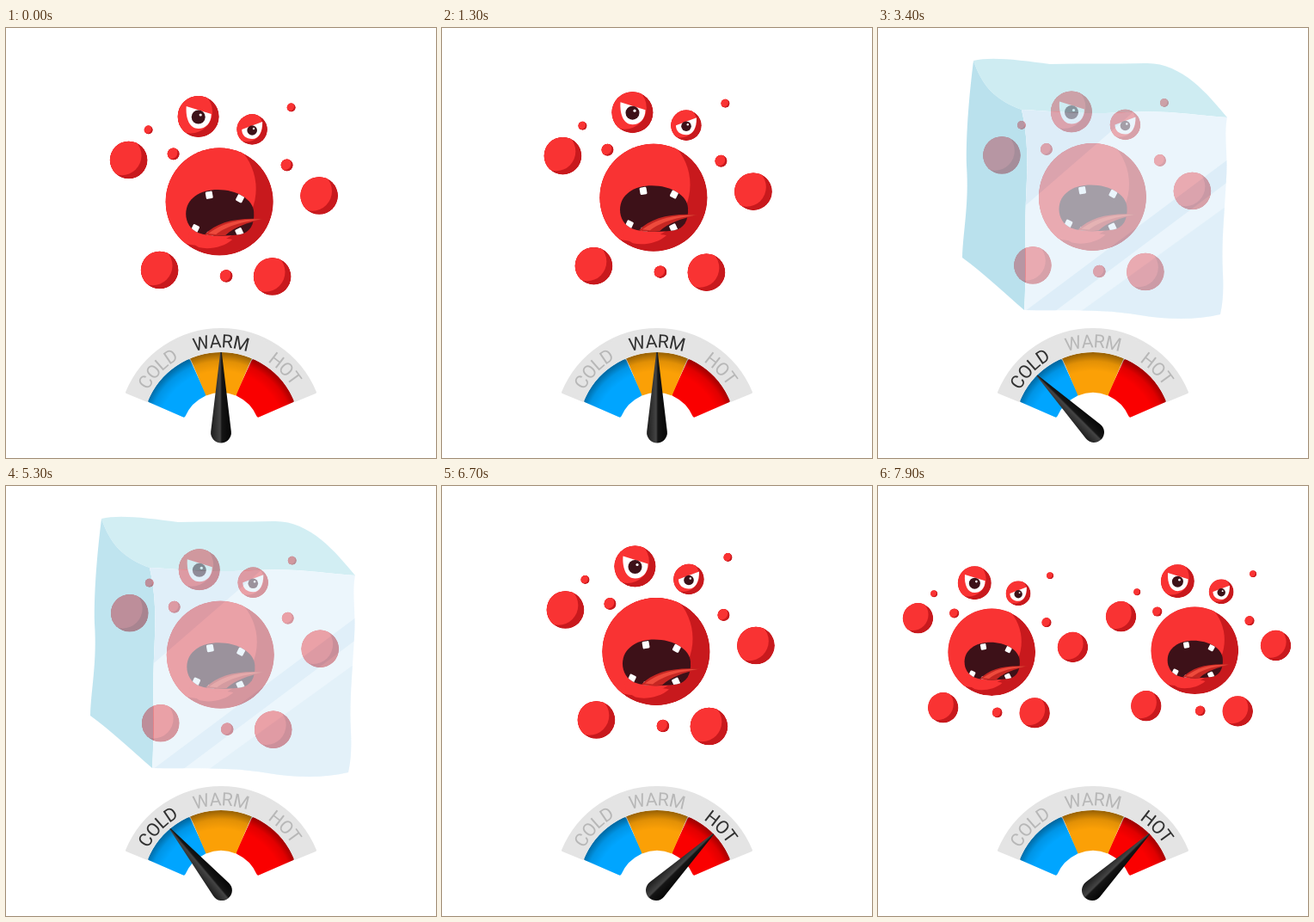
An HTML page that plays this animation: 500x500 px, repeating every 8000 ms.

```html
<!DOCTYPE html>
<html lang="en">
<head>
<meta charset="utf-8">
<title>Germ thermometer</title>
<style>
html, body { margin: 0; width: 100%; height: 100%; overflow: hidden; background: #fff; }
svg { display: block; width: 100vw; height: 100vh; }
text { font: 21.3px Roboto, sans-serif; letter-spacing: -.4px; text-anchor: middle; }
</style>
</head>
<body>
<svg viewBox="0 0 500 500">
  <defs>
    <clipPath id="unit"><circle r="1"/></clipPath>
    <g id="ball" clip-path="url(#unit)">
      <circle r="1" fill="#c8191d"/>
      <circle cx="-.37" cy="-.24" r="1.05" fill="#f93333"/>
    </g>
    <clipPath id="mouthClip"><path id="mouthShape" d="M-39 14C-39-4-22-14-2-14C20-14 39-3 40 12C41 27 35 36 24 38C8 40-12 41-25 36C-34 32-39 24-39 14Z"/></clipPath>
    <g id="germ">
      <g id="balls"></g>
      <g transform="scale(62.5)"><use href="#ball"/></g>
      <path d="M-34 34C-15 46 0 40 15 44C5 53-12 56-24 53C-33 48-40 42-34 34Z" fill="#f93333"/>
      <use href="#mouthShape" fill="#3d1118"/>
      <g clip-path="url(#mouthClip)" fill="#fff">
        <rect x="-4" y="-4" width="8" height="8.5" rx="1.5" transform="translate(-12 -8) rotate(-10)"/>
        <rect x="-4" y="-4" width="8" height="8.5" rx="1.5" transform="translate(24 -4) rotate(27)"/>
        <rect x="-4" y="-4" width="8" height="9" rx="1.5" transform="translate(-28 31) rotate(25)"/>
        <rect x="-4" y="-4" width="8" height="9" rx="1.5" transform="translate(-11 39) rotate(8)"/>
        <rect x="-4" y="-4" width="8" height="9" rx="1.5" transform="translate(23 35) rotate(-25)"/>
      </g>
      <path d="M-17 38C-3 24 18 18 51 20C31 25 18 29 7 39C-2 40-10 40-17 38Z" fill="#c52622"/>
      <path d="M-13 37C4 25 20 20 48 20.500C22 24 8 29-4 38Z" fill="#ee4a3c"/>
      <g transform="translate(-24.500 -99)">
        <path d="M-14-12L15-3C15 8 8 14 0 14C-10 14-15 3-14-12Z" fill="#fff"/>
        <circle cy=".5" r="8" fill="#3d1118"/>
        <circle cx="2.500" cy="-2" r="1.600" fill="#fff"/>
      </g>
      <g transform="translate(38 -84)">
        <path d="M12-9L-12 0C-12 7-7 11 0 11C8 11 12 3 12-9Z" fill="#fff"/>
        <circle cy="1" r="5.800" fill="#3d1118"/>
        <circle cx="1.800" cy="-1" r="1.200" fill="#fff"/>
      </g>
    </g>
    <radialGradient id="shade" gradientUnits="userSpaceOnUse" cx="0" cy="4" r="95">
      <stop offset=".78" stop-opacity="0"/><stop offset=".9" stop-opacity=".1"/><stop offset="1" stop-opacity=".38"/>
    </radialGradient>
    <linearGradient id="metal">
      <stop offset="0" stop-color="#1c1c1c"/><stop offset=".46" stop-color="#444"/>
      <stop offset=".54" stop-color="#151515"/><stop offset="1" stop-color="#050505"/>
    </linearGradient>
    <clipPath id="front"><path id="frontShape" d="M167 95C205 97 245 101 290 98C335 95 375 102 406 104C402 125 407 145 405 175C403 215 399 250 401 285C402 305 401 320 398 333C370 340 335 339 305 334C260 326 215 329 170 328C173 280 170 240 172 200C174 160 175 130 167 95Z"/></clipPath>
    <path id="arc" d="M-97.500 0A97.500 97.500 0 0 1 97.500 0"/>
  </defs>

  <use id="left" href="#germ"/>
  <use id="right" href="#germ"/>

  <g id="ice">
    <path d="M111 38C130 33 165 37 200 42C240 41 275 42 310 41C352 39 383 76 406 104C375 102 335 95 290 98C245 101 205 97 167 95C138 84 122 70 111 38Z" fill="#b3e2ec"/>
    <path d="M111 38C122 70 138 84 167 95C175 130 174 160 172 200C170 240 173 280 170 328C147 308 124 286 98 267C99 235 106 205 103 160C102 120 107 70 111 38Z" fill="#92d1e4"/>
    <use href="#frontShape" fill="#e0f0fb"/>
    <g clip-path="url(#front)" fill="#c0e0f2" fill-opacity=".7">
      <path d="M160 95H300L165 212Z"/>
      <path d="M170 330L408 152V178L205 330Z"/>
      <path d="M235 330L408 205V345H235Z" fill-opacity=".5"/>
    </g>
  </g>

  <g transform="translate(250 469)">
    <g id="dial" stroke-linejoin="round"></g>
    <g id="labels"></g>
    <path id="needle" d="M-.8-92H.8L11.800 0A11.900 11.900 0 1 1-11.800 0Z" fill="url(#metal)"/>
  </g>
</svg>
<script>
const $ = id => document.getElementById(id);
const clamp = x => Math.max(0, Math.min(1, x));
const ramp = (t, a, b) => clamp((t - a) / (b - a));
const inOut = (p, n = 2) => p < .5 ? (2 * p) ** n / 2 : 1 - (2 - 2 * p) ** n / 2;

// x, y, radius, relative to the big ball
$('balls').innerHTML = [
  [-24.5, -99, 24], [38, -84, 17.7], [83.5, -109.5, 5], [-82.5, -83.5, 5],
  [-53.5, -55.5, 7], [-105.5, -48.5, 21.8], [116, -7, 21.8], [78.5, -42.5, 7],
  [-69.5, 79.5, 21.8], [8, 86.5, 7.3], [61.5, 87, 21.8]
].map(([x, y, r]) => `<use href="#ball" transform="translate(${x} ${y}) scale(${r})"/>`).join('');

// A ring sector; the border, if any, rounds its corners
function sector(r0, r1, from, to, fill, border = 0) {
  const at = (r, deg) => {
    const a = deg * Math.PI / 180;
    return `${r * Math.sin(a)} ${-r * Math.cos(a)}`;
  };
  return `<path fill="${fill}" stroke="${fill}" stroke-width="${border}" d="M${at(r0, from)}L${at(r1, from)}
    A${r1} ${r1} 0 0 1 ${at(r1, to)}L${at(r0, to)}A${r0} ${r0} 0 0 0 ${at(r0, from)}Z"/>`;
}
$('dial').innerHTML =
  sector(47.5, 89.5, -66.5, -25, '#00a5ff', 5) +
  sector(47.5, 89.5, 25, 66.5, '#fa0000', 5) +
  sector(45, 92, -22.8, 22.8, '#fba006') +
  sector(60, 92, -68, 68, 'url(#shade)') +
  sector(93.5, 118.5, -67.5, 67.5, '#e4e4e4', 3);

$('labels').innerHTML = ['COLD', 'WARM', 'HOT'].map((word, i) =>
  `<text transform="rotate(${(i - 1) * 45.5})"><textPath href="#arc" startOffset="50%">${word}</textPath></text>`).join('');
const labels = $('labels').children;

// time, x, y of the drifting germ
const drift = [
  [0, -1.3, 5.5], [500, 5.5, 1], [900, 2.5, -1.5], [1300, -3.5, .7], [1600, -5.2, -2.5],
  [2000, -4, -2], [2400, -3, 0], [3000, 0, 0], [5200, 0, 0], [5700, -2, -2],
  [6200, -3.5, -5], [6700, -.5, -4], [7900, .8, -4.3], [8000, .8, -4.3]
];
function driftAt(t) {
  const i = drift.findIndex(k => k[0] > t);
  const [a, b] = [drift[i - 1], drift[i]];
  const p = (1 - Math.cos(Math.PI * ramp(t, a[0], b[0]))) / 2;
  return [a[1] + (b[1] - a[1]) * p, a[2] + (b[2] - a[2]) * p];
}

function draw(t) {
  const [x, y] = driftAt(t);
  const split = inOut(ramp(t, 6800, 8000));
  const place = (el, side) => el.setAttribute('transform',
    `translate(${249.5 + x + side * 119.7 * split} ${196.5 + y - side * split}) scale(${1 - .19 * split})`);
  place($('left'), -1);
  place($('right'), 1);

  const cool = inOut(ramp(t, 2000, 3300));
  $('ice').setAttribute('opacity', .63 * cool * (1 - inOut(ramp(t, 5100, 5850), 3)));
  $('needle').setAttribute('transform', `rotate(${-45 * cool + 90.5 * inOut(ramp(t, 5080, 6000), 3)})`);

  const lit = [
    ramp(t, 2000, 2900) - ramp(t, 5300, 5800),
    1 - ramp(t, 2250, 3100),
    ramp(t, 5400, 5900)
  ];
  lit.forEach((k, i) => {
    const v = 183 - 135 * k;
    labels[i].setAttribute('fill', `rgb(${v},${v},${v})`);
  });
}

const start = performance.now();
function tick() {
  const t = (performance.now() - start) % 8000;
  draw(Math.floor(t / 100) * 100);
  requestAnimationFrame(tick);
}
tick();
</script>
</body>
</html>
```
